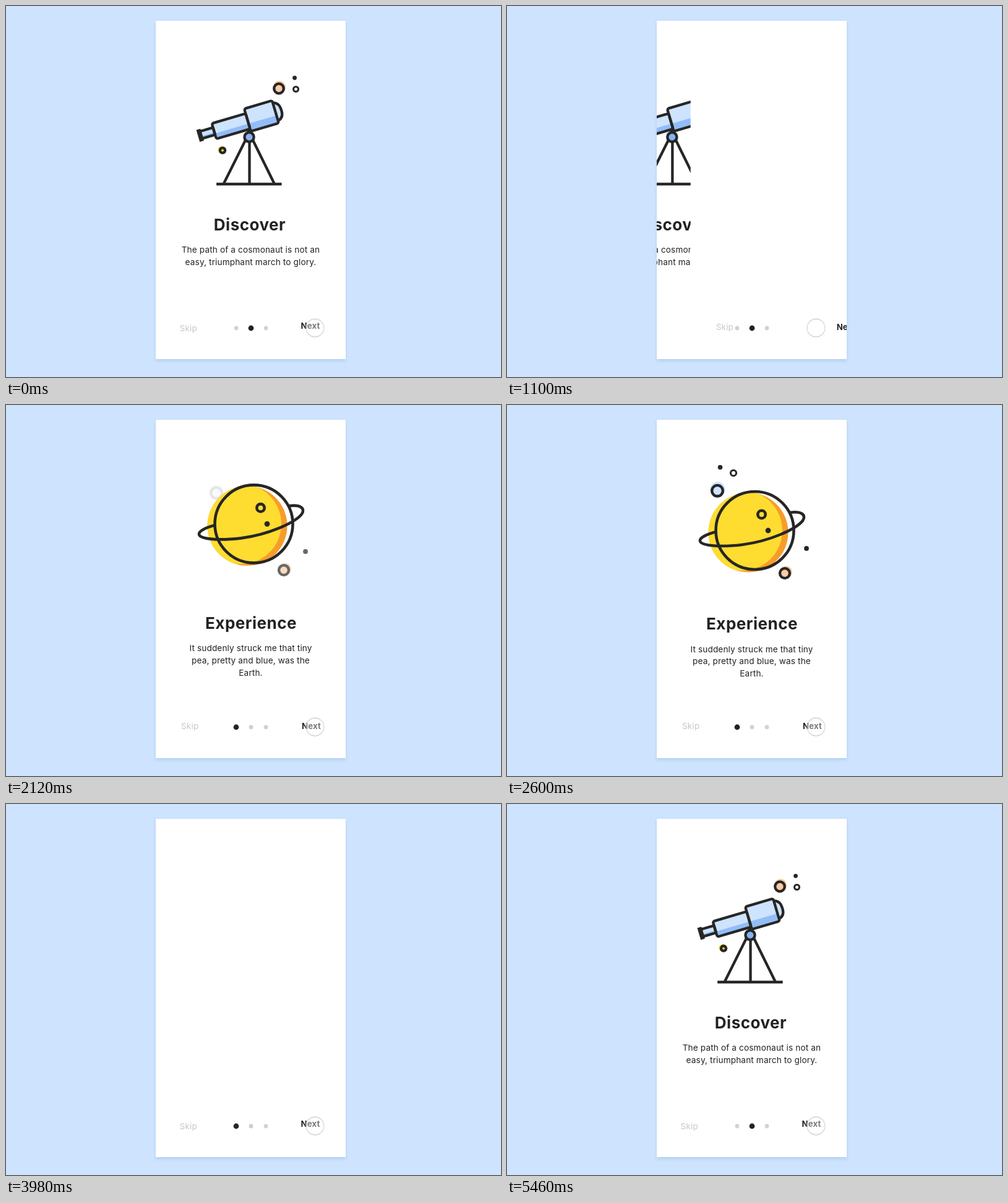
Animation of 800 by 600 pixels, one loop 5480 ms. Source, as an HTML page:

```html
<!DOCTYPE html>
<html lang="en">
<head>
<meta charset="utf-8">
<title>Onboarding</title>
<style>
  html, body { margin: 0; width: 100%; height: 100%; overflow: hidden; background: #cde3fe; }
  svg { display: block; }
  text { font-family: Inter, "Open Sans", sans-serif; font-size: 13.6px; letter-spacing: .14px; fill: #222; }
  .title { font-size: 26px; font-weight: 700; letter-spacing: .5px; }
  .mid { text-anchor: middle; }
  .skip { fill: #c8c8c8; }
  .next { font-size: 13.2px; font-weight: 700; }
  .line { fill: none; stroke: #262626; stroke-width: 4.3; stroke-linejoin: round; }
  .thin { stroke-width: 3; }
  .ink { fill: #262626; }
  .white { fill: #fff; }
  .sky { fill: #cde3fe; }
  .blue { fill: #93bdf7; }
  .peach { fill: #fbcaa2; }
  .sun { fill: #ffdc30; }
  .card { fill: #fff; filter: drop-shadow(0 3px 2.5px rgba(90, 140, 190, .22)); }
  .touch { fill: #fff; fill-opacity: .4; }
  .rim { fill: none; stroke: #e4e4e4; stroke-width: .8; filter: drop-shadow(0 1px .6px rgba(0, 0, 0, .3)); }
</style>
</head>
<body>
<!-- data-in: delay, duration, dx, dy, fade time, overshoot -->
<svg width="800" height="600" viewBox="0 0 800 600">
  <defs>
    <clipPath id="globe"><circle cx="390" cy="206" r="64.5"/></clipPath>
  </defs>
  <rect class="card" x="242" y="24" width="307" height="547"/>
  <svg id="pages" x="242" y="24" width="307" height="547" viewBox="242 24 307 547">
    <g id="experience">
      <rect class="white" x="242" y="24" width="307" height="547"/>
      <g data-in="1270 700 0 4 280 1.7">
        <circle class="sky" cx="340.5" cy="136.5" r="12"/>
        <circle class="line" cx="340" cy="139" r="8.8"/>
      </g>
      <g data-in="1104 700 0 -40 280 1.7">
        <circle class="peach" cx="451.5" cy="270" r="9.5"/>
        <circle class="line" cx="449" cy="272" r="8"/>
      </g>
      <circle class="ink" cx="484" cy="232" r="3.9" data-in="1104 700 0 40 280 1.7"/>
      <circle class="line thin" cx="366" cy="111.5" r="4.6" data-in="1360 700 0 15 280 1.7"/>
      <circle class="ink" cx="344.5" cy="102" r="3.8" data-in="1430 700 0 15 280 1.7"/>
      <g data-in="760 780 0 130 200 1.7">
        <circle cx="390" cy="206" r="64.5" fill="#f79c2a"/>
        <circle class="sun" cx="380" cy="203" r="65" clip-path="url(#globe)"/>
        <g class="line" style="stroke-width:4.6">
          <circle cx="400.5" cy="203" r="63"/>
          <path d="M338 205C322 209 311 215 312 220C314 228 345 230 380 226C425 220 467 201 478 187C484 178 476 171 457 174"/>
          <circle cx="411.5" cy="177" r="6.2"/>
        </g>
        <circle class="ink" cx="422" cy="203" r="4.4"/>
      </g>
      <text class="title mid" x="396" y="363" data-in="770 780 0 14 250 1.7">Experience</text>
      <g class="mid" data-in="790 780 0 12 250 1.7">
        <text x="395.5" y="399.5">It suddenly struck me that tiny</text>
        <text x="395.5" y="419.3">pea, pretty and blue, was the</text>
        <text x="395.5" y="439">Earth.</text>
      </g>
      <text class="skip" x="283" y="524">Skip</text>
      <text class="next" x="478" y="524">Next</text>
    </g>
    <g id="discover">
      <rect class="white" x="242" y="24" width="307" height="547"/>
      <g data-in="1207 1100 0 -51 280 1.7">
        <circle class="sun" cx="348" cy="232.3" r="5.6"/>
        <circle class="sun" cx="350" cy="233.5" r="3"/>
        <circle class="line" cx="350" cy="233.5" r="4.1"/>
      </g>
      <g data-in="1207 700 0 12 280 1.7">
        <circle class="peach" cx="442" cy="131" r="10"/>
        <circle class="line" cx="441" cy="133.5" r="7.8"/>
      </g>
      <circle class="ink" cx="466.5" cy="116" r="3.4" data-in="1440 1000 0 -8 280 1.7"/>
      <circle class="line thin" cx="468.5" cy="134.5" r="4" data-in="1470 700 0 15 280 1.7"/>
      <g class="line" data-in="930 300 0 10 200 0">
        <path d="M393.5 218V290M387 217L351.5 288M399 217L434 288"/>
      </g>
      <path class="line" d="M340 288H445.5" data-in="1303 1000 -72 0 80 1.7"/>
      <g data-in="990 400 105 -30 200 0">
        <g transform="translate(387.2 184.3) rotate(-16.4)">
          <path class="line" d="M50-14Q60-12 60 2Q60 14 50 16" style="fill:#cde3fe"/>
          <path class="sky" d="M-76-3h22v-7h57v-8h47v38h-47v-4h-57v-7h-22z"/>
          <path class="blue" d="M-76 5h22v2h104v13h-47v-4h-57v-7h-22z"/>
          <g class="line">
            <path d="M-76-3h22v12h-22z"/>
            <rect x="-54" y="-10" width="57" height="26" rx="3"/>
            <rect x="3" y="-18" width="47" height="38" rx="3"/>
            <path d="M-77.5-7V13" style="stroke-width:7"/>
          </g>
        </g>
        <path class="line" d="M391 199L393 205"/>
        <circle class="line" cx="393" cy="212" r="7.6" style="fill:#85b4f6"/>
      </g>
      <text class="title mid" x="394" y="363" data-in="800 780 0 14 250 1.7">Discover</text>
      <g class="mid" data-in="820 780 0 12 250 1.7">
        <text x="395.5" y="399">The path of a cosmonaut is not an</text>
        <text x="395.5" y="418.5">easy, triumphant march to glory.</text>
      </g>
      <text class="skip" x="280.5" y="525.5">Skip</text>
      <text class="next" x="476.5" y="521.5">Next</text>
    </g>
  </svg>
  <circle class="dot" cx="372" cy="521"/>
  <circle class="dot" cx="396" cy="521"/>
  <circle class="dot" cx="420" cy="521"/>
  <circle class="touch" cx="499.4" cy="519.8" r="14.6"/>
  <circle class="rim" cx="499.4" cy="519.8" r="14.6"/>
</svg>
<script>
const LOOP = 5480, WIDTH = 307, SWIPE = 520;
const TO_EXPERIENCE = 820, TO_DISCOVER = 3197;
const pages = document.getElementById('pages');
const experience = document.getElementById('experience');
const discover = document.getElementById('discover');
const dots = document.querySelectorAll('.dot');

const clamp = u => Math.min(1, Math.max(0, u));

// cubic-bezier(.4, 0, .2, 1)
function smooth(u) {
  u = clamp(u);
  let lo = 0, hi = 1;
  for (let i = 0; i < 24; i++) {
    const s = (lo + hi) / 2, r = 1 - s;
    if (1.2 * s * r * r + .6 * s * s * r + s ** 3 < u) lo = s; else hi = s;
  }
  return lo * lo * (3 - 2 * lo);
}

const backOut = (u, c) => 1 + (c + 1) * (u - 1) ** 3 + c * (u - 1) ** 2;

const partsOf = page => [...page.querySelectorAll('[data-in]')].map(el =>
  ({ el, spec: el.dataset.in.split(' ').map(Number) }));
const experienceParts = partsOf(experience), discoverParts = partsOf(discover);

function enter(parts, time) {
  for (const { el, spec: [delay, duration, dx, dy, fade, c] } of parts) {
    const left = 1 - backOut(clamp((time - delay) / duration), c);
    el.setAttribute('transform', `translate(${dx * left} ${dy * left})`);
    el.setAttribute('opacity', clamp((time - delay) / fade));
  }
}

const place = (page, x) => page.setAttribute('transform', `translate(${x} 0)`);

function draw(t) {
  const first = t < TO_DISCOVER;
  const p = smooth((t - (first ? TO_EXPERIENCE : TO_DISCOVER)) / SWIPE);
  const [top, under] = first ? [experience, discover] : [discover, experience];
  if (pages.lastElementChild !== top) pages.append(top);
  place(top, WIDTH * (1 - p));
  place(under, -WIDTH / 2 * p);

  enter(experienceParts, t - TO_EXPERIENCE);
  enter(discoverParts, (first ? t + LOOP : t) - TO_DISCOVER);

  const fade = start => smooth((t - start - 720) / 700);
  const w = fade(TO_EXPERIENCE) - fade(TO_DISCOVER);
  [w, 1 - w, 0].forEach((on, i) => {
    const grey = Math.round(210 - 176 * on);
    dots[i].setAttribute('r', 3.4 + on);
    dots[i].setAttribute('fill', `rgb(${grey},${grey},${grey})`);
  });
}

const begin = performance.now();
function tick() {
  draw((performance.now() - begin) % LOOP);
  requestAnimationFrame(tick);
}
tick();
</script>
</body>
</html>
```
